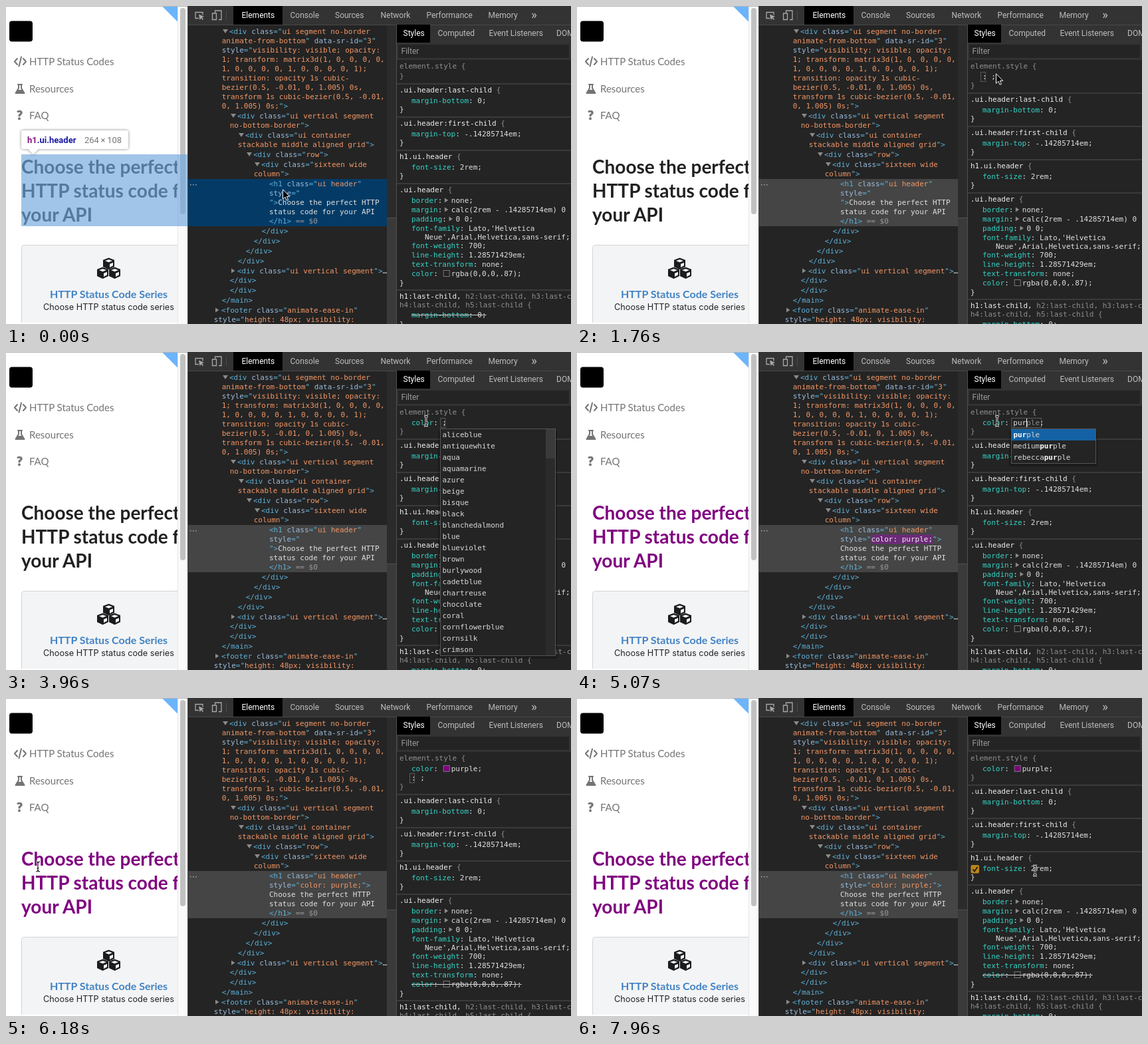
An HTML page that plays this animation: 850 px wide and 478 px high, repeating every 8 s.

```html
<!DOCTYPE html>
<html lang="en">
<head>
<meta charset="utf-8">
<title>Editing a heading colour in the inspector</title>
<style>
html, body { margin: 0; height: 100%; overflow: hidden; background: #fff; }
svg { display: block; width: 100vw; height: 100vh; }
text { white-space: pre; }
.mono { font: 11px "DejaVu Sans Mono", monospace; }
.ui { font: 12px Roboto, sans-serif; }
.lato { font-family: Lato, sans-serif; }
</style>
</head>
<body>
<svg viewBox="0 0 850 478">
  <clipPath id="page"><rect width="258" height="478"/></clipPath>
  <g id="base"></g>
  <g id="live"></g>
</svg>
<script>
const CHAR = 6.622, LOOP = 8000;
const INK = { b: '#5db0d7', a: '#9bbbdc', o: '#f29766', w: '#e0e0e0', g: '#8f8f8f', p: '#35d4c7', s: '#f0f0f0' };

const esc = s => s.replace(/&/g, '&amp;').replace(/</g, '&lt;');
const rect = (x, y, w, h, fill, more = '') => `<rect x="${x}" y="${y}" width="${w}" height="${h}" fill="${fill}" ${more}/>`;
const path = (d, fill, more = '') => `<path d="${d}" fill="${fill}" ${more}/>`;
const text = (x, y, s, cls, fill, more = '') => `<text x="${x}" y="${y}" class="${cls}" fill="${fill}" ${more}>${esc(s)}</text>`;
// Runs are split by "|"; the first letter of each run picks its ink.
const code = (x, y, runs) => `<text x="${x}" y="${y + 4}" class="mono">` +
  runs.split('|').map(r => `<tspan fill="${INK[r[0]]}">${esc(r.slice(1))}</tspan>`).join('') + '</text>';
const down = (x, y) => path(`M${x} ${y - 3}h8l-4 6z`, '#8a8a8a');
const right = (x, y) => path(`M${x} ${y - 3.5}v7l5.5-3.5z`, '#8a8a8a');
const cube = (x, y) => path(`M${x} ${y - 8.5}l8.500 3.200v10.200l-8.500 4.200l-8.500-4.200v-10.200z`, '#1b1c1d') +
  path(`M${x} ${y - 6}l5.500 2.100l-5.500 2.200l-5.500-2.200zM${x + 1.5} ${y + 6}v-5.200l5-2.100v4.600z`, '#f3f4f5');

function page() {
  const grey = '#747474', icon = `stroke="${grey}" stroke-width="2" stroke-linecap="round" stroke-linejoin="round"`;
  const item = (y, s) => text(35, y, s, 'lato', grey, 'font-size="15"');
  return rect(0, 0, 274, 478, '#fff') +
    rect(5, 22.5, 35, 31, '#000', 'rx="4"') +
    path('M234.500 0h23.500v23.500z', '#6cb4fc') + rect(0, 0, 273, 1, '#b5b5b5') +
    item(89, 'HTTP Status Codes') + item(129.500, 'Resources') + item(170, 'FAQ') +
    path('M17 79l-4 4.5l4 4.5M26 79l4 4.5l-4 4.5M23 76.5l-3.5 14', 'none', icon) +
    path('M18 118h6M19 118.500v5l-4.500 7.500h13l-4.500-7.500v-5', 'none', icon) +
    path('M17.500 126h7l3 5h-13z', grey) +
    text(16, 171, '?', 'lato', grey, `font-size="19" font-weight="900" stroke="${grey}" stroke-width=".6"`) +
    '<g clip-path="url(#page)">' +
    rect(23.5, 359.5, 264, 130, '#f3f4f5', 'stroke="#d4d4d5" rx="4"') + rect(0, 476, 258, 2, '#fff') +
    cube(154.500, 387) + cube(145.500, 401) + cube(163.500, 401) +
    text(154.500, 438.500, 'HTTP Status Code Series', 'lato', '#4183c4', 'font-size="16" font-weight="700" text-anchor="middle"') +
    text(154.500, 457, 'Choose HTTP status code series', '', '#222', 'font-size="12.7" font-family="Inter, sans-serif" text-anchor="middle"') +
    '</g>' +
    rect(258, 1, 15, 477, '#fafafa') + rect(258, 1, 1, 477, '#e6e6e6') + rect(262, 3, 8, 310, '#c1c1c1', 'rx="4"');
}

function elements() {
  // Opening tags, wrapped lines and closing tags, each indented by depth.
  const open = (depth, y, cls, end = '') =>
    down(326 + 12 * depth, y) + code(336 + 12 * depth, y, `b<div |aclass|b="|o${cls}${end}`);
  const wrap = (depth, y, runs) => code(324.700 + 12 * depth, y, runs);
  const close = (depth, y, tag = 'div') => wrap(depth + 1, y, `b</${tag}>`);
  return rect(273, 0, 577, 478, '#242424') +
    open(0, 38, 'ui segment no-border') +
    wrap(0, 52, 'oanimate-from-bottom|b" |adata-sr-id|b="|o3|b"') +
    wrap(0, 66, 'astyle|b="|ovisibility: visible; opacity:') +
    ['1; transform: matrix3d(1, 0, 0, 0, 0,', '1, 0, 0, 0, 0, 1, 0, 0, 0, 0, 1);', 'transition: opacity 1s cubic-',
      'bezier(0.5, -0.01, 0, 1.005) 0s,', 'transform 1s cubic-bezier(0.5, -0.01,']
      .map((s, i) => wrap(0, 80 + 14 * i, 'o' + s)).join('') +
    wrap(0, 150, 'o0, 1.005) 0s;|b">') +
    open(1, 165, 'ui vertical segment') + wrap(1, 179, 'ono-bottom-border|b">') +
    open(2, 194, 'ui container') + wrap(2, 208, 'ostackable middle aligned grid|b">') +
    open(3, 223, 'row', '|b">') +
    open(4, 238, 'sixteen wide') + wrap(4, 252, 'ocolumn|b">') +
    [338, 353, 368, 383].map((y, i) => close(4 - i, y)).join('') +
    right(339, 398) + code(348, 398, 'b<div |aclass|b="|oui vertical segment|b">|w…') +
    close(0, 412) + close(0, 427) + close(-1, 442, 'main') +
    right(315, 457) + code(324, 457, 'b<footer |aclass|b="|oanimate-ease-in|b"') +
    wrap(-1, 471, 'astyle|b="|oheight: 48px; visibility:') +
    rect(573, 28, 14, 450, '#2b2b2b') + rect(573, 318, 14, 160, '#3a3a3a') + rect(573, 318, 14, 1, '#505050') +
    rect(587, 28, 1, 450, '#505050');
}

function toolbar() {
  const tab = (x, y, s, on) => text(x, y, s, 'ui', on ? '#fff' : '#bdbdbd');
  const line = 'stroke="#a8a8a8" stroke-width="1.3"';
  return rect(273, 0, 577, 28, '#333') + rect(342, 0, 74, 28, '#000') + rect(273, 28, 577, 1, '#484848') +
    rect(273, 0, 1, 478, '#484848') +
    path('M290 18.500h-5v-9h11v4', 'none', line) + path('M290 12.500l8 3.500l-3.300 1.200l2.300 2.600l-1.200 1.100l-2.400-2.600l-1.800 3z', '#a8a8a8') +
    path('M314.500 10v-3h9.500v13.500h-4M310.500 11h6v9.500h-6z', 'none', line) + rect(331, 7, 1, 14, '#4c4c4c') +
    tab(354.500, 18, 'Elements', 1) + tab(427.500, 18, 'Console') + tab(495, 18, 'Sources') + tab(563.500, 18, 'Network') +
    tab(632.500, 18, 'Performance') + tab(725.500, 18, 'Memory') +
    text(790, 19, '»', 'ui', '#bdbdbd', 'style="font-size:19px"') +
    rect(588, 29, 262, 26, '#333') + rect(588, 28, 50, 27, '#000') +
    tab(597.500, 45, 'Styles', 1) + tab(649.500, 45, 'Computed') + tab(726.500, 45, 'Event Listeners') + tab(828, 45, 'DOM Breakpoints') +
    rect(588, 55, 262, 26, '#333') + rect(590, 58, 257, 20, '#242424') +
    text(594.500, 72, 'Filter', 'ui', '#9a9a9a');
}

const NAMES = ['color', 'caption-side', 'caret-color', 'clear', 'clip', 'clip-path', 'clip-rule', 'color-interpolation',
  'color-interpolation-filters', 'color-rendering', 'column-count', 'column-fill', 'column-gap', 'column-rule',
  'column-rule-color', 'columns', 'contain', 'content', 'counter-reset', 'cursor', 'background-color', 'border-bottom-color',
  'border-color', 'border-left-color', 'border-right-color', 'border-top-color', 'flood-color', 'lighting-color',
  'outline-color', 'stop-color', 'text-decoration-color', '-webkit-border-after-color', '-webkit-border-before-color',
  '-webkit-text-fill-color', '-webkit-text-stroke-color'];
const COLORS = ('aliceblue antiquewhite aqua aquamarine azure beige bisque black blanchedalmond blue blueviolet brown burlywood ' +
  'cadetblue chartreuse chocolate coral cornflowerblue cornsilk crimson lightgoldenrodyellow mediumpurple palegoldenrod palegreen ' +
  'paleturquoise palevioletred papayawhip peachpuff peru pink plum powderblue purple rebeccapurple').split(' ');

function suggest(list, typed) {
  const hits = list.filter(s => s.includes(typed));
  return [...hits.filter(s => s.startsWith(typed)), ...hits.filter(s => !s.startsWith(typed))];
}

function popup(x, hits, typed) {
  const width = Math.round(41 + CHAR * Math.max(...hits.map(s => s.length)));
  const rows = hits.slice(0, 20), height = rows.length * 17;
  let out = rect(x - 3, 118, width + 6, height + 3, '#000', 'opacity=".25" rx="3"') +
    rect(x + .5, 115.500, width, height + 1, '#242424', 'stroke="#555"');
  if (typed) out += rect(x + 1, 116, width - 1, 17, '#1462a5');
  rows.forEach((s, i) => {
    const at = s.indexOf(typed), end = at + typed.length;
    out += `<text x="${x + 3.400}" y="${128 + 17 * i}" class="mono" fill="#d8d8d8">${s.slice(0, at)}` +
      `<tspan font-weight="700" fill="#fff">${typed}</tspan>${s.slice(end)}</text>`;
  });
  if (hits.length > 20) out += rect(x + width - 14, 116, 14, height, '#2b2b2b') + rect(x + width - 14, 116, 14, 44, '#3a3a3a');
  return out;
}

// What has been typed, and since when.
const KEYS = [[1280, ''], [2060, 'c'], [2220, 'co'], [2420, 'col'], [2640, 'colo'], [3180, 'color'], [3480, 'color:'],
  [4500, 'color:p'], [4720, 'color:pu'], [4940, 'color:pur'], [5690, 'next']];
const COMMIT = 5690, BLUR = 6900, PURPLE = 4720;

const field = (x, y, n) => rect(x - 2.500, y - 6.500, n * CHAR + 5, 14, '#242424', 'stroke="#5a5a5a"');
const swatch = (x, y, fill) => rect(x + .5, y - 4.500, 9, 9, fill, 'stroke="#777"');
const check = y => rect(592.500, y - 5, 12.500, 12.500, '#bb8420', 'rx="2"') +
  path(`M595.500 ${y + 1.500}l2.500 3l4.500-6.500`, 'none', 'stroke="#241a08" stroke-width="1.8"');

function prop(y, name, value, mark, struck) {
  const end = 610 + (name.length + 1) * CHAR;
  const x = mark == 'fold' ? end + 13.500 : mark ? end + 20 : end + CHAR;
  return code(610, y, `p${name}|w:`) + code(x, y, 'w' + value) +
    (mark == 'fold' ? right(end + 3.500, y) : mark ? swatch(end + 8, y, mark) : '') +
    (struck ? rect(610, y, x + value.length * CHAR - 610, 1, '#d0d0d0') : '');
}

function editor(t) {
  const key = KEYS.filter(k => k[0] <= t).pop();
  if (!key || t >= BLUR) return '';
  const [since, typed] = key;
  const caret = (x, y) => (t - since) % 960 < 480 ? rect(x, y - 6, 1, 13, '#fff') : '';
  if (typed == 'next') return field(610, 120, .3) + code(610, 120, 'w: ;') + caret(610, 120);
  const [name, value] = typed.split(':'), inValue = value !== undefined;
  const part = inValue ? value : name, x = inValue ? 610 + 7 * CHAR : 610;
  const hits = suggest(inValue ? COLORS : NAMES, part);
  const rest = part ? hits[0].slice(part.length) : '';
  const caretX = Math.round(x + part.length * CHAR);
  return (inValue ? code(610, 106, 'pcolor|w:') : '') +
    field(x, 106, part.length + rest.length || .3) +
    code(x, 106, `w${part}|g${rest}|w${inValue ? ';' : ': ;'}`) + caret(caretX, 106) +
    (typed ? popup(Math.round(x - 3), hits, part) : '');
}

function styles(t, mouse) {
  const done = t >= COMMIT;
  const shift = t < 1280 ? 0 : done && t < BLUR ? 28 : 14;
  const rule = (y, sel, props, height) => rect(588, y - 9.500, 262, 1, '#505050') + code(592, y, sel + '|g {') + props + code(592, y + height, 'w}');
  const body = rule(126, 's.ui.header:last-child', prop(142, 'margin-bottom', '0;'), 29) +
    rule(176, 's.ui.header:first-child', prop(192, 'margin-top', '-.14285714em;'), 29) +
    rule(226, 'sh1.ui.header', prop(242, 'font-size', '2rem;'), 29) +
    rule(276, 's.ui.header', prop(292, 'border', 'none;', 'fold') + prop(306, 'margin', 'calc(2rem - .14285714em) 0 1rem;', 'fold') +
      prop(320, 'padding', '0 0;', 'fold') + prop(334, 'font-family', "Lato,'Helvetica") +
      code(630, 347, "wNeue',Arial,Helvetica,sans-serif;") + prop(360, 'font-weight', '700;') +
      prop(374, 'line-height', '1.28571429em;') + prop(388, 'text-transform', 'none;') +
      prop(402, 'color', 'rgba(0,0,0,.87);', '#222', done), 140) +
    rect(588, 426.500, 262, 1, '#505050') +
    code(592, 436, 'sh1:last-child,|g h2:last-child, h3:last-child,') + code(592, 449, 'gh4:last-child, h5:last-child {') +
    prop(464, 'margin-bottom', '0;', '', true) + code(592, 478, 'w}');
  let box = '';
  if (t > 6300 && mouse.x > 588) {
    const row = Math.max(0, Math.ceil((mouse.y - 117 - shift) / 50));
    if (row) box = check(92 + 50 * row + shift);
    else if (t >= BLUR) box = check(106);
  }
  return code(592, 90, 'gelement.style {') + code(592, 105 + shift, 'g}') + `<g transform="translate(0 ${shift})">${body}</g>` +
    (done ? prop(106, 'color', 'purple;', 'purple') : '') + box + editor(t);
}

function node(t) {
  const purple = t >= PURPLE;
  const flash = purple ? Math.max(0, Math.min(1, (5700 - t) / 300)) : 0;
  return rect(274, 260, 299, 71, t < 1170 ? '#043b66' : '#454545') +
    [277, 281, 285].map(x => rect(x, 268, 1.500, 1.500, '#aaa')).join('') +
    rect(442, 274.500, 93, 14, '#6c2a78', `opacity="${flash}"`) +
    code(396, 267, 'b<h1 |aclass|b="|oui header|b"') +
    code(396, 281, purple ? `astyle|b="|${flash > .4 ? 's' : 'o'}color: purple;|b">` : 'astyle|b="') +
    code(396, 295, purple ? 'wChoose the perfect HTTP' : 'b">|wChoose the perfect HTTP') +
    code(396, 309, 'wstatus code for your API') + code(396, 323, 'b</h1>') +
    text(396 + 6 * CHAR, 327, '== $0', 'mono', '#999', 'font-style="italic"');
}

function heading(t, hover) {
  const lines = ['Choose the perfect', 'HTTP status code for', 'your API'].map((s, i) =>
    text(23, 252 + 36 * i, s, 'lato', t >= PURPLE ? 'purple' : '#212121', 'font-size="28" font-weight="700"')).join('');
  const tip = hover ? rect(23, 223, 250, 108, '#6fa8dc', 'opacity=".66"') +
    '<g style="filter:drop-shadow(0 0 2px #0007)">' + path('M26 187h155q3 0 3 3v22q0 3-3 3h-132l-8 8l-8-8h-7q-3 0-3-3v-22q0-3 3-3z', '#fff') + '</g>' +
    '<text x="32" y="206" font-family="Roboto, sans-serif" font-size="13" font-weight="700" fill="#1a1aa6"><tspan fill="#881280">h1</tspan>.ui.header</text>' +
    text(118, 206, '264\u2009×\u2009108', '', '#777', 'font-family="Roboto, sans-serif" font-size="13"') : '';
  return `<g clip-path="url(#page)">${lines}</g>` + tip;
}

// time, x, y, and whether the text cursor shows from then on
const TRACK = [[0, 416, 275, 0], [210, 416, 275, 0], [600, 596, 262, 0], [990, 630, 101, 0], [2059, 630, 101, 0], [2060, 632, 103, 1],
  [5860, 632, 103, 0], [6000, 330, 190, 0], [6140, 48, 253, 1], [6240, 48, 253, 0], [6550, 793, 171, 0], [6640, 812, 182, 0],
  [6880, 794, 110, 0], [7150, 774, 136, 0], [7440, 768, 152, 0], [7500, 768, 152, 0], [7920, 689, 259, 1], [LOOP, 689, 259, 1]];

function pointer(t) {
  const i = TRACK.findIndex(k => k[0] > t), a = TRACK[i - 1], b = TRACK[i];
  const u = (t - a[0]) / (b[0] - a[0]), e = u * u * (3 - 2 * u);
  return { x: a[1] + (b[1] - a[1]) * e, y: a[2] + (b[2] - a[2]) * e, beam: a[3] };
}

function cursor({ x, y, beam }) {
  const bar = 'M-3-7q3 0 3 2.500q0-2.500 3-2.500M0-5v11M-3 8q3 0 3-2.500q0 2.500 3 2.500M-1.500 3h3';
  return `<g transform="translate(${x.toFixed(1)} ${y.toFixed(1)})">` + (beam
    ? path(bar, 'none', 'stroke="#fff" stroke-width="2.8"') + path(bar, 'none', 'stroke="#000" stroke-width="1.1"')
    : path('M.5.8v14.500l3.400-3.200l2.300 5.200l2.300-1l-2.200-5h4.500z', '#000', 'stroke="#fff"')) + '</g>';
}

const base = document.getElementById('base'), live = document.getElementById('live');
base.innerHTML = page() + elements() + toolbar();
let shown = '';
function frame() {
  const t = performance.now() % LOOP, mouse = pointer(t);
  const next = heading(t, t < 1170 && mouse.x < 573) + node(t) + styles(t, mouse) + cursor(mouse);
  if (next !== shown) live.innerHTML = shown = next;
  requestAnimationFrame(frame);
}
frame();
</script>
</body>
</html>
```
